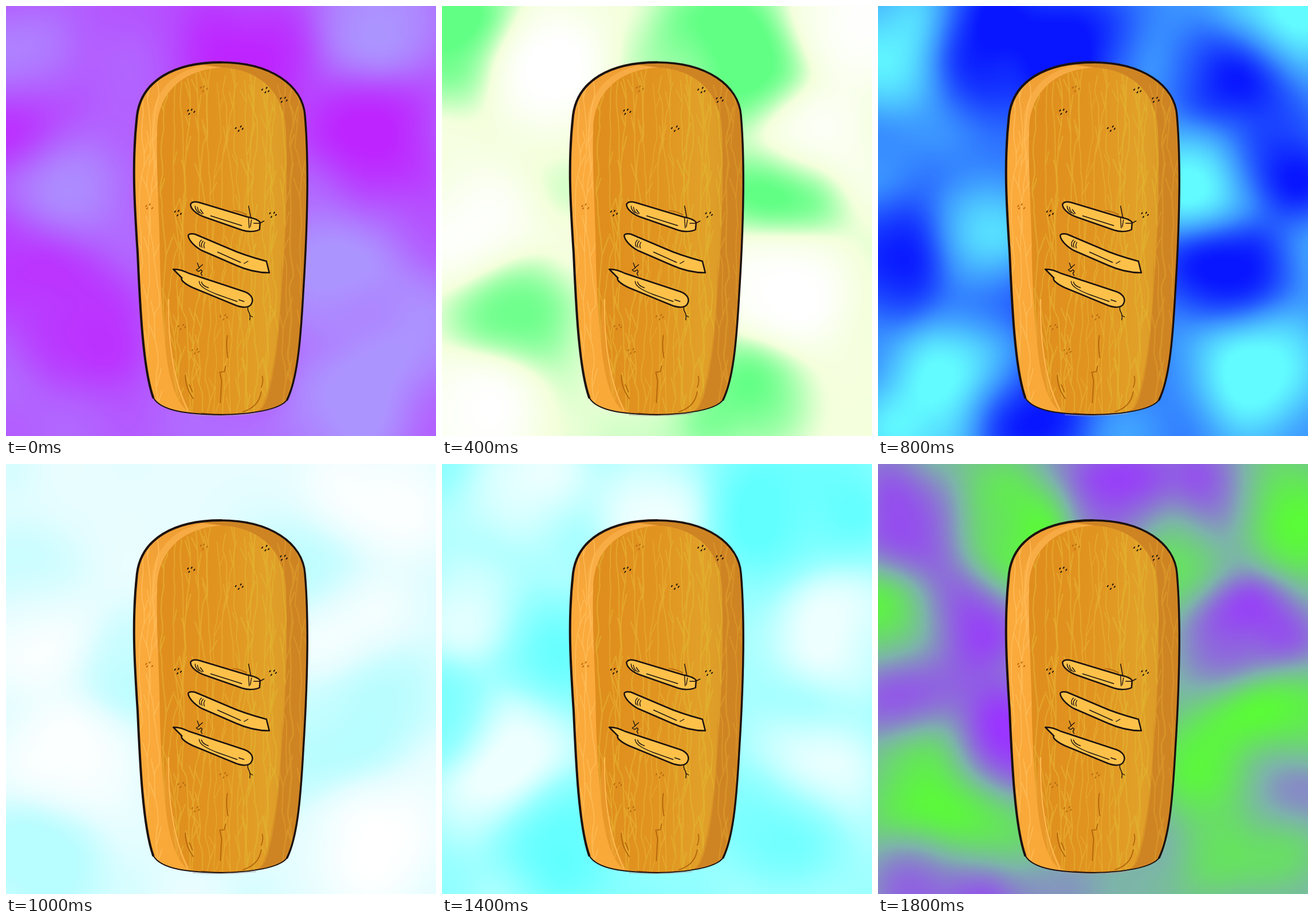
Animation of 748x748 px, one loop 2000 ms. Source, as an HTML page with a canvas:

```html
<!DOCTYPE html>
<html lang="en">
<head>
<meta charset="utf-8">
<title>Loaf on colour clouds</title>
<style>
  html, body { margin: 0; width: 100%; height: 100%; overflow: hidden; }
  #stage { position: relative; width: 748px; height: 748px; overflow: hidden; }
  canvas, svg { position: absolute; left: 0; top: 0; width: 748px; height: 748px; }
  canvas { visibility: hidden; animation: show 2s step-end infinite; }
  @keyframes show { 0% { visibility: visible; } 10%, 100% { visibility: hidden; } }
  .ink { fill: none; stroke: #1c1110; stroke-linecap: round; stroke-linejoin: round; }
  .crack { fill: none; stroke: #b0630c; stroke-width: 1.7; stroke-linecap: round; }
  .stick { fill: #fdc14a; stroke: #1c1110; stroke-width: 2.5; stroke-linejoin: round; }
  .grain { fill: none; stroke-linecap: round; stroke-linejoin: round; }
</style>
</head>
<body>
<div id="stage">
<svg viewBox="0 0 748 748">
  <defs>
    <path id="loaf" d="M228 190C236 130 292 98 374 98C460 98 516 138 520 190C527 270 524 390 517 500C512 590 506 650 489 685C476 703 425 710 374 711C320 710 270 706 256 681C238 630 233 520 229 430C223 340 219 270 228 190Z"/>
    <path id="face" d="M263 215C264 155 302 112 374 107C446 110 484 155 487 215C490 300 487 400 479 500C474 590 466 650 451 690Q446 703 430 707Q374 713 318 706C296 692 283 650 277 590C270 520 268 470 267 400C265 330 261 270 263 215Z"/>
    <clipPath id="inLoaf"><use href="#loaf"/></clipPath>
    <clipPath id="inFace"><use href="#face"/></clipPath>
    <linearGradient id="faceFill">
      <stop offset="0" stop-color="#df8d1d"/>
      <stop offset=".5" stop-color="#e19420"/>
      <stop offset=".85" stop-color="#e1a029"/>
      <stop offset="1" stop-color="#dc9b27"/>
    </linearGradient>
    <linearGradient id="sideFill" x2="0" y2="1">
      <stop offset="0" stop-color="#ee9d33"/>
      <stop offset=".25" stop-color="#fbaa3c"/>
      <stop offset="1" stop-color="#f9a938"/>
    </linearGradient>
  </defs>

  <path d="M325 711Q380 715 435 709" fill="none" stroke="#a99a9a" stroke-opacity=".5" stroke-width="2"/>
  <g clip-path="url(#inLoaf)">
    <use href="#loaf" fill="url(#sideFill)"/>
    <path d="M318 98L376 107L400 400L430 712H530V90Z" fill="#cf8423"/>
    <path d="M270 180Q290 125 376 107L340 104Q268 120 254 190Q252 300 266 340Z" fill="#fdb44f" opacity=".6"/>
    <g id="sideGrain"></g>
    <use href="#face" fill="url(#faceFill)"/>
    <g clip-path="url(#inFace)">
      <g id="faceGrain"></g>
      <path d="M281 505C280 590 294 665 324 709H296L270 600Z" fill="#f5a63a" opacity=".4"/>
      <path d="M283 510C281 585 292 655 317 705" fill="none" stroke="#ffb951" stroke-width="2"/>
      <path d="M479 440C480 550 464 660 440 709H465L492 600Z" fill="#cf8423" opacity=".45"/>
    </g>
  </g>

  <g class="crack">
    <path d="M385 573Q382 590 386 612M382 626L380 636L372 637L375 652L373 690"/>
    <path d="M312 642Q312 665 326 683M319 659L324 671M446 644Q448 655 444 663M444 671C441 690 430 700 412 706"/>
    <path d="M395 356Q408 357 418 363M340 708Q374 712 408 709"/>
  </g>
  <g id="crumbs"></g>

  <use href="#loaf" class="ink" stroke-width="2"/>
  <path class="ink" stroke-width="3.4" d="M374 98C460 98 516 138 520 190C527 270 524 390 517 500C512 590 506 650 489 685"/>
  <path class="ink" stroke-width="4" d="M256 681C238 630 233 520 229 430C223 340 219 270 228 190C236 130 292 98 374 98"/>

  <g class="stick">
    <path d="M321 345C323 340 330 340 337 342L420 367Q440 371 442 377L441 389C434 393 420 393 411 390L345 367C331 362 321 353 321 345Z"/>
    <path d="M317 399Q319 395 329 397L388 422C410 432 438 440 453 444L458 464C440 464 420 460 400 451L340 425C326 417 317 406 317 399Z"/>
    <path d="M291 458Q302 457 318 465L415 497C428 502 431 511 427 518C423 526 410 525 398 520L325 490C310 483 303 476 306 473Z"/>
  </g>
  <g class="ink" stroke-width="1.4">
    <path d="M422 348L426 369M422 369L423 386M427 372L425 384M431 378L441 378L449 374M356 365L410 382"/>
    <path d="M329 348Q329 355 336 360M333 350Q334 358 341 362M338 354L343 361"/>
    <path d="M340 407Q334 412 338 419M343 409Q338 414 341 420M346 411Q343 416 345 421M368 428L408 446M414 448L421 444"/>
    <path d="M336 479C336 488 350 495 368 502L402 514M340 480Q342 487 352 490M405 511L414 514"/>
    <path d="M333 447L336 456L331 459Q334 464 339 459Q343 461 339 465L341 469M336 455L342 450"/>
    <path d="M421 524C418 531 427 532 424 546M424 538L429 541"/>
  </g>
</svg>
</div>
<script>
const SIZE = 748, RES = 187, CELLS = 7, SPREAD = 55;
const stage = document.getElementById('stage');

function rng(seed) {
  return () => (seed = (seed * 16807) % 2147483647) / 2147483647;
}

const points = text => text ? text.split(',').map(p => p.trim().split(' ').map(Number)) : [];
const rgb = hex => [1, 3, 5].map(i => parseInt(hex.slice(i, i + 2), 16));
const lerp = (a, b, t) => a + (b - a) * t;
const smooth = t => t * t * (3 - 2 * t);

// Smooth value noise in -1..1 over the stage.
function valueNoise(seed) {
  const r = rng(seed), row = CELLS + 2;
  const grid = Array.from({ length: row * row }, () => r() * 2 - 1);
  return (x, y) => {
    const u = x / SIZE * CELLS, v = y / SIZE * CELLS;
    const i = Math.floor(u), j = Math.floor(v), k = j * row + i, s = smooth(u - i);
    return lerp(lerp(grid[k], grid[k + 1], s), lerp(grid[k + row], grid[k + row + 1], s), smooth(v - j));
  };
}

// A noise field pulled to the low or high colour near a few key points.
function paintCloud({ seed, colors, low, high }) {
  const [lo, mid, hi] = colors.split(' ').map(rgb);
  const pulls = [...points(low).map(p => [...p, -1]), ...points(high).map(p => [...p, 1])];
  const noise = valueNoise(seed), gain = pulls.length ? .3 : .9;
  const canvas = document.createElement('canvas');
  canvas.width = canvas.height = RES;
  const ctx = canvas.getContext('2d'), img = ctx.createImageData(RES, RES);
  for (let n = 0; n < RES * RES; n++) {
    const x = (n % RES + .5) * SIZE / RES, y = (Math.floor(n / RES) + .5) * SIZE / RES;
    let sum = 0, weight = .25;
    for (const [px, py, sign] of pulls) {
      const w = Math.exp(-((x - px) ** 2 + (y - py) ** 2) / (2 * SPREAD ** 2));
      sum += sign * w;
      weight += w;
    }
    const v = Math.max(-1, Math.min(1, 1.2 * sum / weight + gain * noise(x, y)));
    const end = v < 0 ? lo : hi;
    for (let c = 0; c < 3; c++) img.data[n * 4 + c] = lerp(mid[c], end[c], Math.abs(v));
    img.data[n * 4 + 3] = 255;
  }
  ctx.putImageData(img, 0, 0);
  return canvas;
}

// One cloud per 200 ms; colours run low, middle, high.
const clouds = [
  { seed: 11, colors: '#be24ff #b35dff #ac94ff',
    low: '430 85, 5 435, 130 555, 20 205, 640 215',
    high: '650 30, 70 315, 10 110, 560 480, 690 560, 590 700' },
  { seed: 41, colors: '#b77cff #cfa4f4 #f2d2ee' },
  { seed: 23, colors: '#62ff85 #f4ffdc #ffffff',
    low: '30 65, 470 70, 550 120, 110 530, 595 325, 530 680',
    high: '180 100, 640 225, 590 480, 50 390, 50 700, 700 40' },
  { seed: 37, colors: '#1057ba #2554b2 #524b93',
    low: '100 295, 540 95, 600 380, 690 210, 560 560',
    high: '690 615, 80 45, 550 270, 230 115' },
  { seed: 53, colors: '#0816ff #3a92ff #62fbff',
    low: '180 65, 330 85, 625 120, 685 260, 40 450, 210 520, 610 460, 250 680',
    high: '25 70, 690 30, 570 310, 180 425, 165 610, 85 700, 650 620' },
  { seed: 67, colors: '#b8fdff #e4fdff #ffffff',
    low: '30 220, 220 350, 640 405, 540 480, 55 685, 545 195',
    high: '635 60, 50 280, 120 515, 590 280, 630 645' },
  { seed: 593, colors: '#84d6ff #a4eaf8 #d6fff4' },
  { seed: 79, colors: '#62ffff #9cffff #eeffff',
    low: '560 90, 660 50, 160 330, 590 620, 10 435, 200 640',
    high: '125 460, 60 270, 90 560, 370 70, 150 40, 695 300, 640 540' },
  { seed: 97, colors: '#79a8ff #72d8f4 #7dffe0' },
  { seed: 83, colors: '#9a36ff #7db4aa #58ff32',
    low: '600 80, 430 85, 70 120, 135 265, 60 395, 210 490, 115 725, 635 290, 690 550',
    high: '225 120, 35 280, 80 535, 705 455, 700 90, 525 155, 600 530, 635 640, 160 630' }
];
clouds.forEach((cloud, i) => {
  const canvas = paintCloud(cloud);
  canvas.style.animationDelay = (i ? i * .2 - 2 : 0) + 's';
  stage.prepend(canvas);
});

function addPath(parent, d, attrs) {
  const path = document.createElementNS('http://www.w3.org/2000/svg', 'path');
  path.setAttribute('d', d);
  for (const key in attrs) path.setAttribute(key, attrs[key]);
  document.getElementById(parent).append(path);
}

// Long wandering veins that fork now and then.
function grain(parent, seed, from, to, gap, color) {
  const r = rng(seed);
  for (let x0 = from; x0 < to; x0 += gap) {
    let x = x0 + r() * 5, y = 95 + r() * 40, d = `M${x} ${y}`;
    while (y < 712) {
      const dx = (r() - .5) * 12 + (x0 - x) * .3, dy = 22 + r() * 30;
      d += `q${dx + r() * 4 - 2} ${dy / 2} ${dx} ${dy}`;
      x += dx;
      y += dy;
      if (r() < .45) {
        const side = r() < .5 ? -1 : 1;
        d += `l${side * (5 + r() * 7)} ${-18 - r() * 20}M${x} ${y}`;
      }
    }
    addPath(parent, d, { class: 'grain', stroke: color, opacity: .7, 'stroke-width': 1.4 + r() * 1.2 });
  }
}
grain('sideGrain', 17, 232, 265, 13, '#ffc15f');
grain('sideGrain', 71, 484, 524, 13, '#dc9c2c');
grain('faceGrain', 29, 276, 400, 13, '#e6ae31');
grain('faceGrain', 53, 402, 490, 11, '#e2b330');

// Small clusters of short flecks around each centre.
function crumbs(seed, color, centres) {
  const r = rng(seed);
  for (const [x, y] of points(centres)) {
    let d = '';
    for (let k = 0; k < 4; k++) {
      const a = (k + r() * .5) * Math.PI / 2;
      d += `M${x + 6 * Math.cos(a)} ${y + 4 * Math.sin(a)}l1.2 -1.6`;
    }
    addPath('crumbs', d, { stroke: color, 'stroke-width': 2, 'stroke-linecap': 'round' });
  }
}
crumbs(5, '#20130c', '321 185, 451 147, 482 164, 405 214, 298 361, 463 364');
crumbs(9, '#b56a10', '343 145, 249 350, 305 559, 329 601, 378 542');
</script>
</body>
</html>
```
